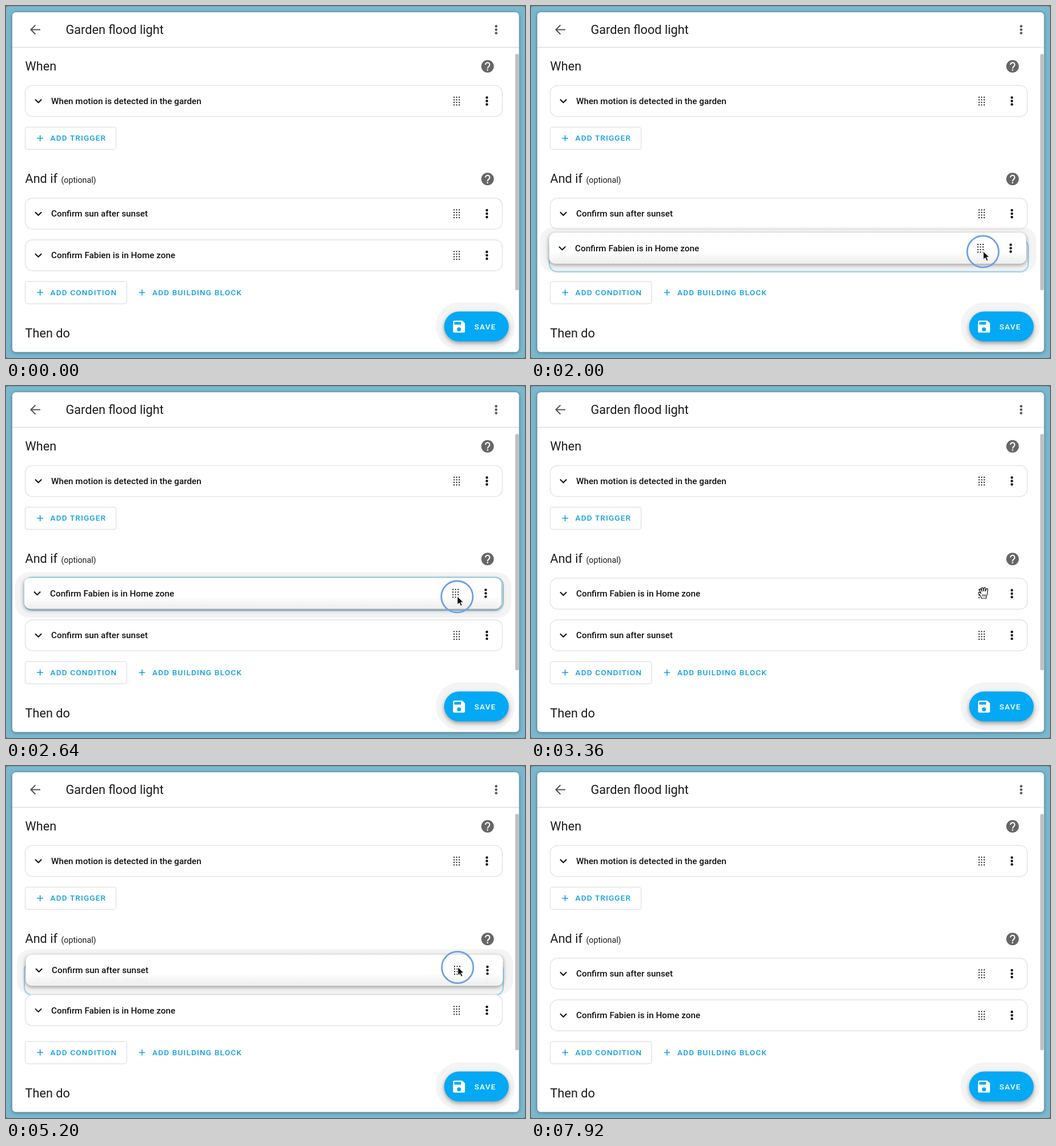
These frames come from a looping animation (908x617 px, 8000 ms). An HTML page:

```html
<!DOCTYPE html>
<html lang="en">
<head>
<meta charset="utf-8">
<title>Reorder conditions</title>
<style>
  html, body { margin: 0; width: 100%; height: 100%; overflow: hidden; background: #64808c; }
  svg { display: block; width: 100%; height: 100%; font-family: Roboto, sans-serif; fill: #1c1c1c; }
  .head { font-size: 21.7px; }
  .note { font-size: 14.2px; }
  .label { font-size: 15.25px; font-weight: 500; fill: #111; }
  .btn { font-size: 13.5px; font-weight: 500; letter-spacing: 1.2px; fill: #119fe0; }
  .box { fill: #fff; stroke: #e0e0e0; stroke-width: 1.3; }
  .line { fill: none; stroke-width: 2; }
  .blue { fill: none; stroke: #119fe0; stroke-width: 1.6; }
  .halo { fill: #000; opacity: .045; }
  .panel { fill: #fff; filter: drop-shadow(0 1px 3px #0006); }
  .save { fill: #03a9f4; filter: drop-shadow(0 3px 3px #0004) drop-shadow(0 3px 5px #0002); }
  .lift { filter: drop-shadow(0 2px 3px #0005) drop-shadow(0 3px 5px #0002); }
</style>
</head>
<body>
<svg id="stage" viewBox="0 0 908 617"></svg>
<script>
const $ = id => document.getElementById(id);
const text = (x, y, cls, s) => `<text x="${x}" y="${y}" class="${cls}">${s}</text>`;
const box = (x, y, w, h, r, cls = 'box', extra = '') =>
  `<rect x="${x}" y="${y}" width="${w}" height="${h}" rx="${r}" class="${cls}" ${extra}/>`;
const dots = (x, y, r, color) =>
  [-6, 0, 6].map(d => `<circle cx="${x}" cy="${y + d}" r="${r}" fill="${color}"/>`).join('');
const plus = (x, y) => `<path class="blue" d="M${x - 5.3} ${y}h10.6M${x} ${y - 5.3}v10.6"/>`;
const help = y => `<g transform="translate(842.5 ${y})"><circle r="11" fill="#666"/>
  <path d="M-3.7 -2.8a3.7 3.7 0 1 1 6.3 2.6C1.2 1 0 1.6 0 4M0 5.4v2.3" class="line" stroke="#fff"/></g>`;

// Row contents, with the vertical centre at 0
function rowParts(label) {
  let grip = '';
  for (let r = 0; r < 4; r++)
    for (let c = 0; c < 3; c++)
      grip += `<rect x="${782.9 + c * 4.5}" y="${-7.6 + r * 4.5}" width="2" height="2"/>`;
  return `<path d="M51 -2.8l5.6 5.6 5.6 -5.6" class="line" stroke="#111"/>` +
    text(79, 5.4, 'label', label) + grip + dots(841.3, 0, 2.2, '#111');
}
const rowBox = box(33.6, -27.2, 834.8, 54.4, 13);
const outline = box(32, -28.4, 838, 57.4, 14, 'line', 'stroke="#03a9f4" stroke-width="2.4"');
const labels = ['Confirm sun after sunset', 'Confirm Fabien is in Home zone'];
const row = i => `<g id="row${i}">${rowBox}<g id="ghost${i}">${outline}</g>${rowParts(labels[i])}</g>`;
const lifted = i => `<g id="lift${i}">${box(18, -37, 868, 80, 24, 'halo')}
  ${box(33.6, -27.2, 834.8, 54.4, 11, 'lift', 'fill="url(#veil)"')}${rowParts(labels[i])}</g>`;

$('stage').innerHTML = `
  <defs><linearGradient id="veil" x2="0" y2="1">
    <stop stop-color="#fff" stop-opacity=".93"/><stop offset=".2" stop-color="#fff"/>
    <stop offset=".6" stop-color="#fff"/><stop offset="1" stop-color="#fff" stop-opacity=".82"/>
  </linearGradient></defs>
  ${box(0, .5, 908, 616.5, 4, '', 'fill="#7bb8cf"')}
  ${box(11, 11, 886.5, 595.5, 6, 'panel')}
  <path d="M11 72.5h886" stroke="#dedede" stroke-width="1.3"/>
  <path d="M60 41.5H44M51.5 33.5l-8 8 8 8" class="line" stroke="#555"/>
  ${text(104.5, 49, 'head', 'Garden flood light')}${dots(857.5, 41.5, 2.2, '#555')}
  ${box(890.8, 84, 6.4, 414.5, 3.2, '', 'fill="#c1c1c1"')}
  ${text(33.5, 113, 'head', 'When')}${help(105.7)}
  <g transform="translate(0 166.5)">${rowBox}${rowParts('When motion is detected in the garden')}</g>
  ${box(33.6, 212.3, 159, 39, 4)}${plus(59.7, 231.8)}${text(77.5, 236.4, 'btn', 'ADD TRIGGER')}
  ${text(33.5, 310.3, 'head', 'And if')}${text(96.5, 310.3, 'note', '(optional)')}${help(303.2)}
  ${row(0)}${row(1)}
  ${box(33.6, 482.8, 177.6, 39, 4)}${plus(59.7, 502.2)}${text(77.5, 506.8, 'btn', 'ADD CONDITION')}
  ${plus(238, 502.2)}${text(256, 506.8, 'btn', 'ADD BUILDING BLOCK')}
  ${text(33.5, 581.3, 'head', 'Then do')}
  ${lifted(0)}${lifted(1)}
  ${box(752, 519.5, 138, 83, 41, 'halo')}${box(766.5, 535.5, 113, 52.5, 26.2, 'save')}
  <path transform="translate(778.5 548) scale(1.17)" fill="#fff" fill-rule="evenodd"
    d="M15 9H5V5h10zM12 19a3 3 0 1 1 0-6 3 3 0 0 1 0 6M17 3H5a2 2 0 0 0-2 2v14a2 2 0 0 0 2 2h14a2 2 0 0 0 2-2V7z"/>
  <g style="--c:#fff"><text x="819.5" y="567" class="btn" style="fill:#fff">SAVE</text></g>
  <g id="cursor">
    <circle id="ring" r="27.6" fill="none" stroke="#6f9fe6" stroke-width="2.8"/>
    <path id="arrow" d="M.5 -.5v14.5l3.4-3.2 2.5 5.4 2.6-1.2-2.4-5.2h4.6z" fill="#111" stroke="#fff"/>
    <g id="hand" fill="#fff" stroke="#111" stroke-width="1.2" stroke-linejoin="round">
      <path d="M-4 10C-5 6-7 4-9 1.500c-1-1.500 1-3 2.500-1.500l1.700 1.500-2.200-6c-.7-2 1.700-2.800 2.500-1l1.500 3.500-.8-5c-.3-2.200 2.300-2.400 2.700-.3L-.3-2.500.3-7.500c.2-2 2.600-1.800 2.600.2L2.800-2.200 4.600-6c.9-1.800 3-.8 2.500 1C6 0 7.500 3 4.500 7V10z"/>
      <path d="M-2 3v4M.6 3v4M3.100 3v4" fill="none" stroke-width="1"/>
    </g>
  </g>`;

const LOOP = 8000, STEP = 80, TOP = 364, GAP = 73;
const outside = [740, 650];
// Cursor moves: start, end, x, y
const moves = [
  [150, 1150, 791, 443], [1720, 2850, 789, 362], [2900, 3200, 792, 362],
  [3500, 4250, 790, 432], [4625, 5300, 790, 348], [5750, 6600, ...outside]
];
const drags = [
  { row: 1, press: 1500, from: 1720, to: 2880, up: 2900, grabY: 443, dx: -2 },
  { row: 0, press: 4300, from: 4625, to: 5440, up: 5500, grabY: 432, dx: 1 }
];

function ease(t, a, b) {
  const u = Math.min(1, Math.max(0, (t - a) / (b - a)));
  return u * u * (3 - 2 * u);
}
const place = (id, x, y) => $(id).setAttribute('transform', `translate(${x} ${y})`);
const show = (id, on) => $(id).style.display = on ? '' : 'none';

function draw(t) {
  let [x, y] = outside;
  for (const [a, b, toX, toY] of moves) {
    const k = ease(t, a, b);
    x += (toX - x) * k;
    y += (toY - y) * k;
  }
  const swap = ease(t, 2400, 2630) - ease(t, 5020, 5250);
  place('row0', 0, TOP + GAP * swap);
  place('row1', 0, TOP + GAP * (1 - swap));

  const drag = drags.find(d => t >= d.from && t < d.to);
  for (const i of [0, 1]) {
    const held = !!drag && drag.row === i;
    $('row' + i).style.opacity = held ? .4 : 1;
    show('ghost' + i, held);
    show('lift' + i, held);
    if (held) place('lift' + i, drag.dx, TOP + GAP + y - drag.grabY);
  }
  const onGrip = Math.abs(x - 788) < 14 && [TOP, TOP + GAP].some(c => Math.abs(y - c) < 17);
  place('cursor', x, y);
  show('hand', onGrip && !drag);
  show('arrow', !onGrip || drag);
  show('ring', drags.some(d => t >= d.press && t < d.up));
}

const start = performance.now();
function frame(now) {
  const t = Math.max(0, now - start) % LOOP;
  draw(Math.floor(t / STEP) * STEP);
  requestAnimationFrame(frame);
}
draw(0);
requestAnimationFrame(frame);
</script>
</body>
</html>
```
